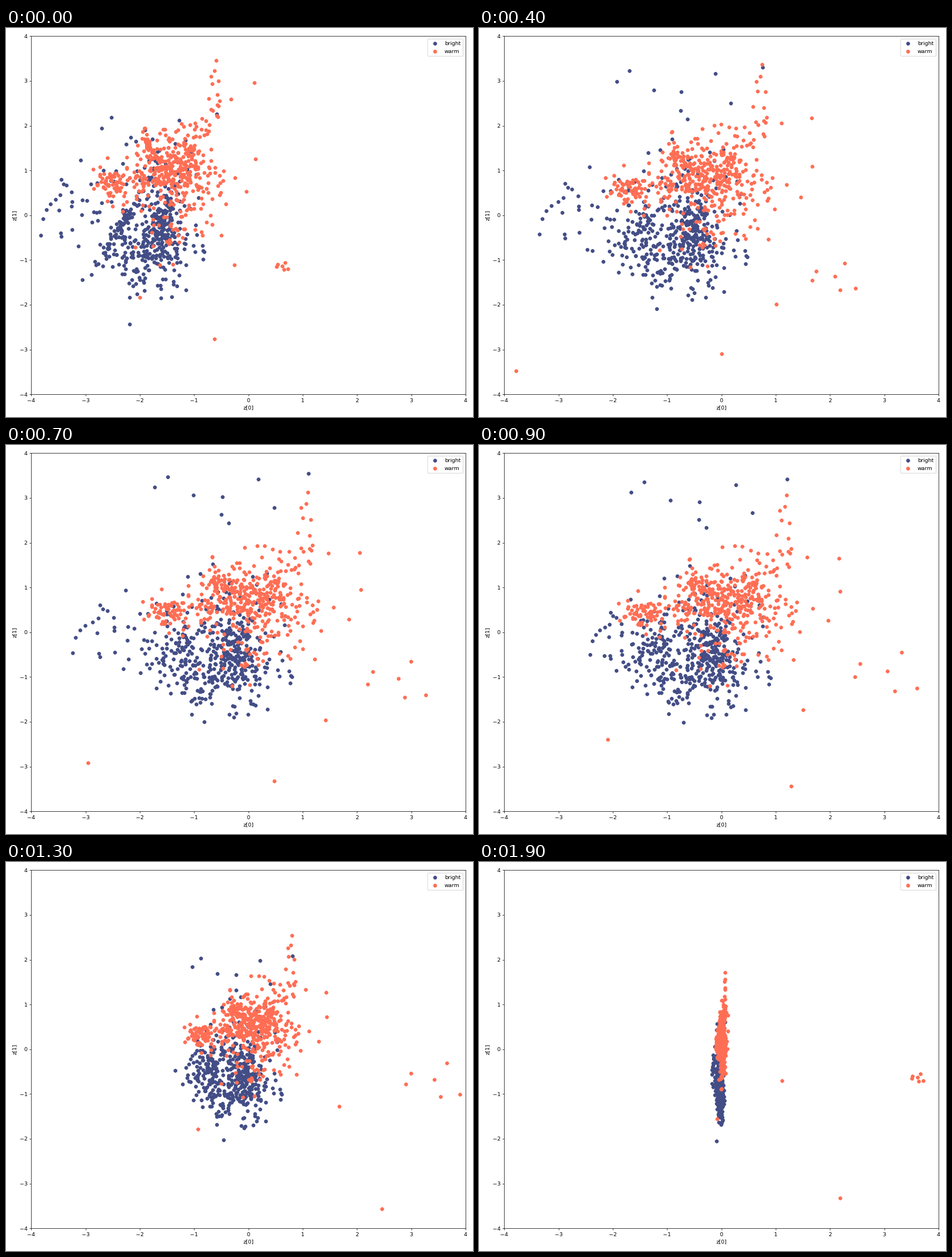
Animation of 820 by 683 pixels, one loop 2000 ms. Source, as a matplotlib script:

```python
import numpy as np
import matplotlib.pyplot as plt
from matplotlib.animation import FuncAnimation

W, H = 820, 683
DPI = W / 12
FRAMES, STEP = 20, 100
END = 1.9  # seconds at the last frame
rng = np.random.default_rng(12)


def progress(t, start):
    return np.clip((t - start) / (END - start), 0, 1)


def place(x, y, t, sink, start):
    """Drift right, open up, then collapse sideways into a column."""
    p = progress(t, start)
    fold = (1 - p) ** 1.7
    settle = np.exp(-t / .33)
    early = np.exp(-(t / .5) ** 2)
    wide = (1 - .28 * settle) * (.055 + .945 * fold)
    tall = (1 + .13 * early) * (.62 + .38 * fold)
    return -1.55 * settle + wide * x, .25 * early - sink * p + tall * y


def cloud(count, cx, cy, sx, sy, tilt=0, start=1.1, swell=0):
    """Cloud whose tilt fades with time; swell lifts it on the way."""
    u, v = np.clip(rng.standard_t(7, size=(2, count)), -3, 3)

    def at(t, sink):
        rho = tilt * np.exp(-t / .6)
        y = cy + sy * (rho * u + np.sqrt(1 - rho * rho) * v)
        x, y = place(cx + sx * u, y, t, sink, start)
        return x, y + swell * np.sin(np.pi * min(t / 1.5, 1))

    return at


def runners(count):
    """Points that leave the crowd and gather again at the right."""
    u, v = rng.uniform(-1.4, 1.4, size=(2, count))

    def at(t, sink):
        slow = np.exp(-t / .7)
        spread = .1 + .45 * np.sin(np.pi * t / END)
        x = .6 + 3.2 * (1 - slow) + spread * u
        y = -.6 - .55 * slow - 5 * t * np.exp(-t / .3) + spread * v
        return x, y

    return at


def stray(*keys):
    """One point moving through a few (time, x, y) keys."""
    times, xs, ys = zip(*keys)
    return lambda t, sink: ([np.interp(t, times, xs)],
                            [np.interp(t, times, ys)])


bright = [
    cloud(85, -.05, -.3, .15, .26, .5),
    cloud(85, -1.1, -.45, .33, .4, .93),
    cloud(95, -.65, -.9, .34, .34, .1),
    cloud(75, .2, -.8, .34, .4, .1),
    cloud(34, -2.1, .05, .45, .45, .2, start=.7),
    cloud(46, -.2, .5, .45, .36),
    cloud(65, -.2, -.75, .2, .38, .6),
    cloud(9, -.4, 1, .9, .35, swell=1.7),
    stray((0, -2.19, -2.43), (.5, -.94, -2), (END, -.09, -2.05)),
]

warm = [
    cloud(185, .12, .68, .36, .27, .1),
    cloud(62, -1.35, .4, .21, .17, -.2),
    cloud(42, -.35, 1.1, .14, .2, -.9),
    cloud(66, .65, .85, .26, .28, .1),
    cloud(30, 1.05, 1.75, .42, .42, .7),
    cloud(28, 1.25, .4, .36, .36),
    cloud(46, .25, -.4, .5, .38),
    cloud(42, -.5, .55, .36, .28, .2),
    runners(6),
    stray((0, -.63, -2.77), (.7, .48, -3.33), (1.2, 2.5, -3.6),
          (END, 2.19, -3.33)),
    stray((0, -.26, -1.11), (.5, 1.33, -2.2), (1.5, 1.76, -1.04),
          (END, 1.12, -.7)),
    stray((0, -2, -1.83), (.2, -3.69, -3.54), (.5, -3.83, -3.44),
          (1.1, -1.22, -1.87), (END, -.08, -1.55)),
]


def points(group, sink, t):
    return np.hstack([part(t, sink) for part in group]).T


# the tiny margin keeps the canvas from rounding down by a pixel
fig = plt.figure(figsize=((W + 1e-6) / DPI, (H + 1e-6) / DPI), dpi=DPI,
                 facecolor="white")
ax = fig.add_axes([44.4 / W, 1 - 643.1 / H, 762.5 / W, 628.7 / H])
ax.set(xlim=(-4, 4), ylim=(-4, 4), xlabel="z[0]", ylabel="z[1]",
       xticks=range(-4, 5), yticks=range(-4, 5))

layers = []
for name, group, sink, color in (("bright", bright, .5, "#434d86"),
                                 ("warm", warm, .15, "#ff6e54")):
    dots = ax.scatter(*points(group, sink, 0).T, color=color, label=name)
    layers.append((dots, group, sink))
ax.legend(loc="upper right")


def draw(i):
    for dots, group, sink in layers:
        dots.set_offsets(points(group, sink, i * STEP / 1000))
    return [layer[0] for layer in layers]


anim = FuncAnimation(fig, draw, frames=FRAMES, interval=STEP,
                     repeat=True, repeat_delay=0)
plt.show()
```
